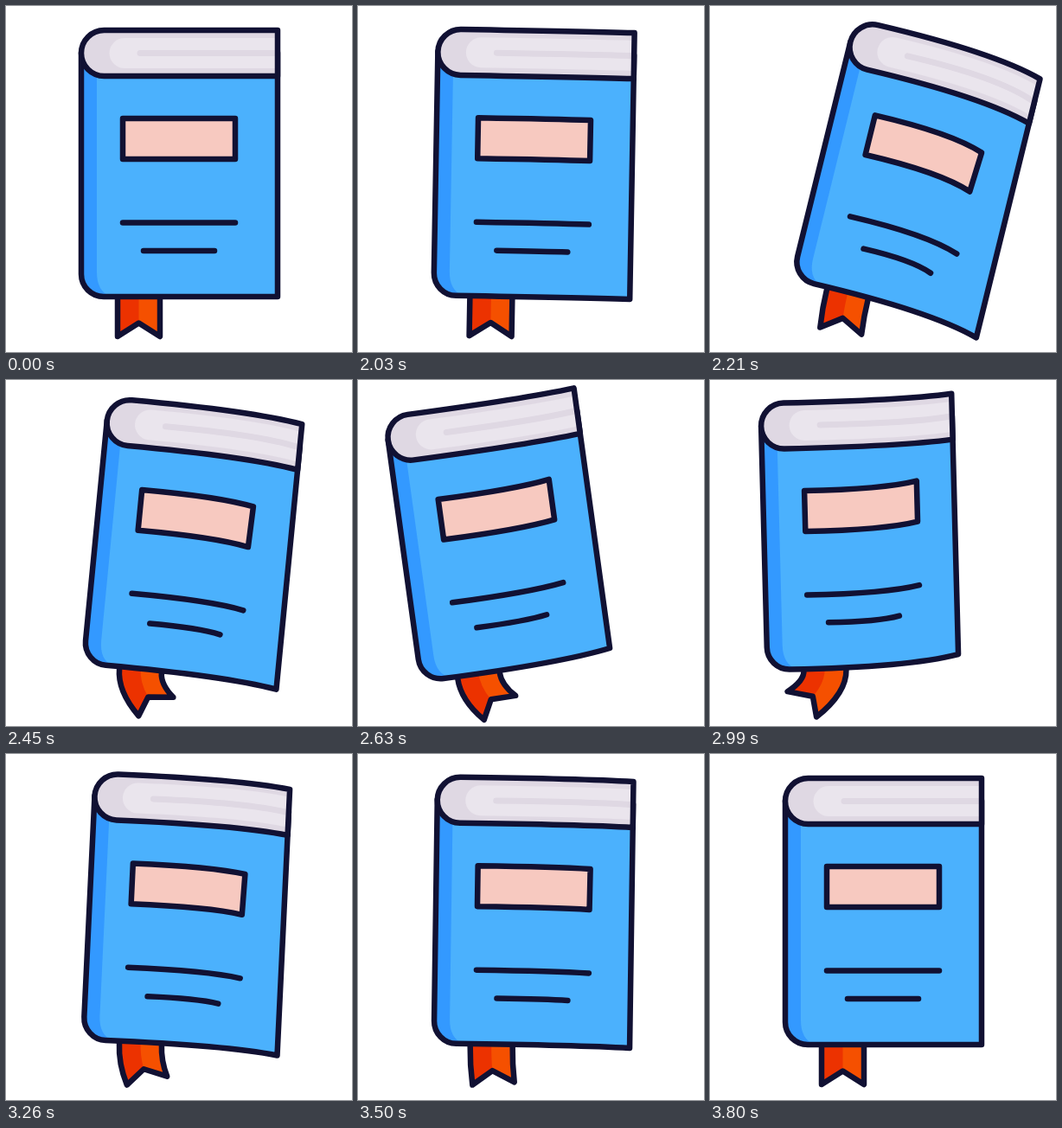
Animation of 400 by 400 pixels, one loop 3.83 s. Source, as an HTML page with a canvas:

```html
<!DOCTYPE html>
<html lang="en">
<head>
<meta charset="utf-8">
<title>Swaying book</title>
<style>
  html, body { margin: 0; width: 100%; height: 100%; overflow: hidden; background: #fff; }
  canvas { display: block; }
</style>
</head>
<body>
<canvas id="stage" width="400" height="400"></canvas>
<script>
const ctx = document.getElementById('stage').getContext('2d');
const LOOP = 3830, START = 2030;
const INK = '#111133';

// Each part swings between a few turning points [time, value]
const tilt = swing([1985, 0], [2260, 15], [2710, -9.7], [3180, 2.9], [3680, 0]);
const shift = swing([2440, 0], [2800, -21], [2950, -21], [3250, 1], [3680, 0]);
const lift = swing([2600, 0], [2950, -3.3], [3620, 0]);
const bend = swing([2000, 0], [2260, 17], [2760, -9], [2920, -9], [3260, 8], [3640, 0]);
const wag = swing([2120, 0], [2540, .66], [2980, -.75], [3290, .28], [3620, 0]);

// Eases with a half cosine from one turning point to the next
function swing(...turns) {
  return t => {
    const i = turns.findIndex(([time]) => time > t);
    if (i < 1) return 0;
    const [t0, a] = turns[i - 1], [t1, b] = turns[i];
    return a + (b - a) * (1 - Math.cos(Math.PI * (t - t0) / (t1 - t0))) / 2;
  };
}

function fill(d, color) {
  ctx.fillStyle = color;
  ctx.fill(new Path2D(d));
}

function stroke(d, color = INK, width = 6.5) {
  ctx.strokeStyle = color;
  ctx.lineWidth = width;
  ctx.stroke(new Path2D(d));
}

// A level line from x0 to x1 whose right end drops by dy; forth and back
const knee = (x0, x1, y, dy) => `Q${x0 + .7 * (x1 - x0)} ${y - .1 * dy} `;
const forth = (x0, x1, y, dy) => knee(x0, x1, y, dy) + `${x1} ${y + dy}`;
const back = (x0, x1, y, dy) => `L${x1} ${y + dy}` + knee(x0, x1, y, dy) + `${x0} ${y}`;
const bar = (x0, x1, y, dy) => `M${x0} ${y}` + forth(x0, x1, y, dy);

function drawRibbon(angle) {
  const size = Math.abs(angle), half = 24.5 - 3 * size;
  const cx = 153.5 + 37 * angle, cy = 382 - 7 * size;
  const dx = half * Math.cos(angle), dy = -half * Math.sin(angle);
  const side = (x, tipX, tipY) => `${x} ${(338 + tipY) / 2} ${tipX} ${tipY}`;
  const notch = `${153.5 + 20 * angle} ${366.5 + 2 * size}`;
  const left = `M129 334V338Q${side(129, cx - dx, cy - dy)}L${notch}`;
  const right = `L${cx + dx} ${cy + dy}Q178 ${(338 + cy + dy) / 2} 178 338V334`;
  fill(left + right + 'Z', '#f55000');
  fill(left + 'Q153.5 352 153.5 334Z', '#ec3200');
  stroke(left + right);
}

function drawBook(b) {
  const down = b < 0;
  const edge = 314 - Math.min(6, down ? -2 * b : b / 4);
  const top = b * (down ? .8 : 1), bottom = b * (down ? 1.7 : 1), inner = b * (down ? 1.1 : .8);

  const cover = `M87 54V310A26 26 0 0 0 113 336${forth(113, edge, 336, bottom)}` +
    `${back(113, edge, 54, top)}Z`;
  fill(cover, '#4bb1fd');
  fill('M87 54V310A26 26 0 0 0 113 336H121Q105 330 105 308V54Z', '#3399ff');
  stroke(cover);

  // A rounded slab of the page block, open to the right
  const slab = (x, y0, y1) => {
    const r = (y1 - y0) / 2;
    return bar(x, edge, y0, top) + back(x, edge, y1, top) + `A${r} ${r} 0 0 1 ${x} ${y0}Z`;
  };
  const pages = slab(113.5, 28, 81);
  fill(pages, '#dfd8e3');
  fill(slab(137, 37, 72), '#eae5ed');
  stroke(bar(155, edge - 3, 54.5, top), '#dfd8e3', 7);
  stroke(pages);

  const skew = .17 * Math.max(0, b);
  const label = bar(135, 265, 130, inner) + back(135, 265 - skew, 177, inner) + 'Z';
  fill(label, '#f7c9c0');
  stroke(label);
  stroke(bar(135, 265, 250.5, inner));
  stroke(bar(159, 241, 283, inner * .7));
}

function draw() {
  const now = performance.now() % LOOP;
  const t = now < START ? 0 : now;
  ctx.setTransform(1, 0, 0, 1, 0, 0);
  ctx.fillStyle = '#fff';
  ctx.fillRect(0, 0, 400, 400);
  ctx.lineCap = ctx.lineJoin = 'round';
  ctx.translate(178 + shift(t), 358 + lift(t));
  ctx.rotate(tilt(t) * Math.PI / 180);
  ctx.translate(-178, -358);
  drawRibbon(wag(t));
  drawBook(bend(t));
  requestAnimationFrame(draw);
}
draw();
</script>
</body>
</html>
```
